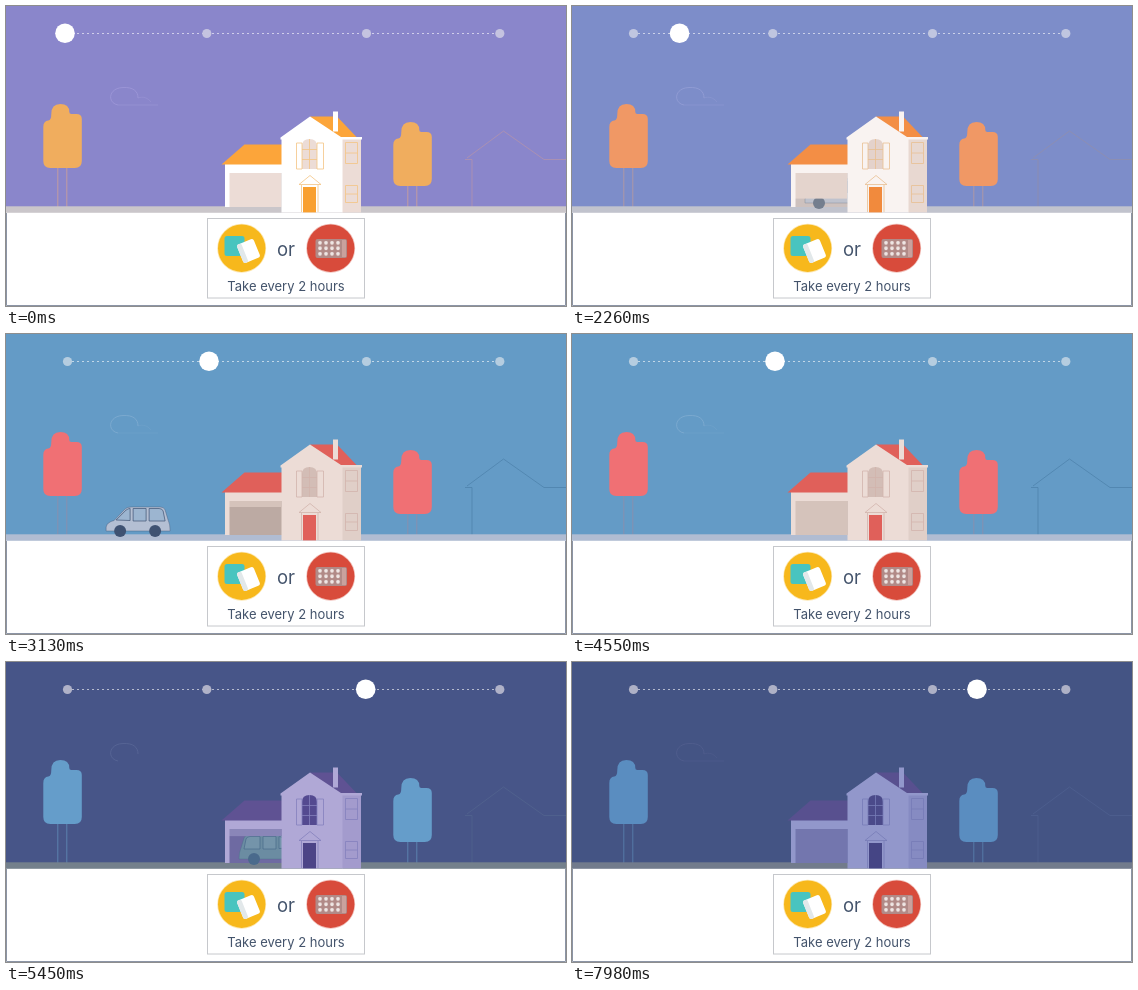
Write an HTML page that moves like this. It is 560 px wide and 300 px high and loops after 8000 ms.

```html
<!DOCTYPE html>
<html lang="en">
<head>
<meta charset="utf-8">
<title>Take every 2 hours</title>
<style>
html, body { margin: 0; width: 100%; height: 100%; overflow: hidden; background: #fff; }
svg { display: block; width: 560px; height: 300px; }
text { font-family: Inter, Lato, sans-serif; fill: #43536b; text-anchor: middle; }
.sky { fill: var(--sky); }
.ground { fill: var(--ground); }
.tree { fill: var(--tree); }
.trunk { fill: none; stroke: var(--trunk); }
.roof { fill: var(--roof); }
.wall { fill: var(--wall); }
.side { fill: var(--side); }
.inside { fill: var(--inside); }
.panel { fill: var(--panel); }
.door { fill: var(--door); }
.pane { fill: var(--pane); }
.trim { fill: none; stroke: var(--trim); stroke-width: .8; }
.far { fill: none; stroke: var(--far); stroke-width: .8; }
.cloud { fill: none; stroke: var(--cloud); stroke-width: .8; }
.body { fill: var(--body); stroke: var(--tyre); stroke-width: .4; }
.glass { fill: var(--glass); stroke: var(--tyre); stroke-width: .7; }
.tyre { fill: var(--tyre); }
.stop { fill: var(--stop); }
</style>
</head>
<body>
<svg id="stage" viewBox="0 0 560 300">
  <defs>
    <linearGradient id="light">
      <stop offset="0" stop-color="#fff" stop-opacity=".75"/>
      <stop offset="1" stop-color="#fff" stop-opacity=".08"/>
    </linearGradient>
    <g id="plant">
      <path class="trunk" d="M51.5 161V201M60.5 161V201"/>
      <path class="tree" d="M44 162Q37 162 37 155V121Q37 115 42 114.500Q45 114 45 108Q45 98 54 98Q63 98 63 106Q63 108 65 108H70Q75.500 108 75.500 113V155Q75.500 162 68.500 162Z"/>
    </g>
    <pattern id="pills" x="311" y="234" width="6" height="5.5" patternUnits="userSpaceOnUse">
      <circle cx="3" cy="2.8" r="1.9" fill="#efe6e4"/>
    </pattern>
  </defs>

  <rect class="sky" width="560" height="207"/>
  <path d="M61 27.5H494" stroke="#fff" stroke-opacity=".6" stroke-dasharray="2 3"/>
  <g class="stop">
    <circle cx="61.5" cy="27.5" r="4.6"/><circle cx="200.8" cy="27.5" r="4.6"/>
    <circle cx="360.5" cy="27.5" r="4.6"/><circle cx="493.8" cy="27.5" r="4.6"/>
  </g>
  <circle id="now" cy="27.3" r="9.8" fill="#fff"/>

  <path class="cloud" d="M112 99C101 97 102 82 117 81.5C127 81 132 85 132 92"/>
  <path class="cloud" id="tail" d="M132 92C137 90 142 92 145 96M112 99H152"/>
  <path class="far" d="M459 153.5H466V201M461 152L497.500 125L538 153.500H560"/>
  <use href="#plant" x=".3"/>
  <use href="#plant" x="350.3" y="18"/>
  <rect class="ground" y="200.300" width="560" height="6.700"/>

  <rect class="inside" x="222" y="166" width="54" height="35"/>
  <g id="car">
    <path class="body" d="M0 197V193Q1 188 8 186.500L19 175Q21 173 25 173H54Q58 173 59 176L62 186Q64 190 64 197Z"/>
    <path class="glass" d="M10 186L20 176Q22 174.500 24 174.500V186.500ZM27 174.500H40V187H27ZM43 174.500H53Q56 174.500 57 177L59 187H43Z"/>
    <circle class="tyre" cx="14" cy="197" r="6"/>
    <circle class="tyre" cx="49" cy="197" r="6"/>
  </g>
  <rect class="panel" id="shutter" x="223" y="166" width="52"/>
  <path class="wall" d="M219 158H276V167H223.500V201H219Z"/>
  <path class="roof" d="M215.500 158.500L238.500 138.500H276V158.500Z"/>
  <path id="beam" d="M62 189L121 181V200L62 193Z" fill="url(#light)"/>

  <path class="roof" d="M304 110.500H331L350.500 131H318Z"/>
  <rect class="wall" x="327" y="105.500" width="5" height="20"/>
  <rect class="side" x="336" y="131" width="19" height="75.500"/>
  <path class="wall" d="M274.500 131.500L304 110.500L335 131H356V133.500H336.500V206.500H275.500V133.500H274.500Z"/>
  <path class="trim" d="M339.500 136.500H351.500V157.500H339.500ZM339.500 147H351.500M339.500 179.500H351.500V196.500H339.500ZM339.500 188H351.500"/>
  <path class="pane" d="M296 163V140Q296 133 303.500 133Q311 133 311 140V163Z"/>
  <path class="trim" d="M290.500 137H296V163H290.500ZM311 137H317.500V163H311ZM303.500 133V163M296 143.500H311M296 153.500H311"/>
  <path class="trim" d="M293 178.500L304 169.500L315 178.500ZM295.500 179V206M312 179V206"/>
  <rect class="door" x="297" y="181" width="13" height="25.500"/>

  <rect y="206.800" width="560" height="94" fill="#fff"/>
  <path d="M.5 207V299.500H559.500V207" fill="none" stroke="#8c95a6"/>
  <rect x="201.500" y="212.500" width="157" height="79.500" fill="#fff" stroke="#c6c8cc"/>
  <g stroke-opacity=".35" stroke-width="1.5">
    <circle cx="235.700" cy="242.200" r="23.700" fill="#f7b81c" stroke="#f7b81c"/>
    <circle cx="324.700" cy="242.200" r="23.700" fill="#d84b3b" stroke="#d84b3b"/>
  </g>
  <rect x="218.500" y="230" width="20" height="20" rx="2.500" fill="#48c4bf"/>
  <g transform="rotate(-22 242.500 245)">
    <rect x="233.500" y="235" width="18" height="20" rx="2.500" fill="#fff"/>
    <rect x="233.500" y="235" width="5" height="20" rx="2" fill="#e2e8ea"/>
  </g>
  <rect x="309.500" y="233" width="31.500" height="19" rx="2" fill="#b18a87"/>
  <rect x="311" y="234" width="24" height="16.500" fill="url(#pills)"/>
  <rect x="336" y="234" width="4" height="17" fill="#c9a19d"/>
  <text x="280" y="249.700" font-size="18.500">or</text>
  <text x="280" y="285" font-size="13">Take every 2 hours</text>
</svg>
<script>
// One colour per time of day: noon, afternoon, night, late night
const colors = {
  sky: "8a86cb 649bc6 475588 445484",
  ground: "cac6ca b0bcd2 74808c 727b8c",
  tree: "f0ad5e f07074 659dca 5a8dc0",
  trunk: "c29ca0 8790b0 5c82b0 567aa8",
  roof: "fca53a e0605a 5f5293 58508f",
  wall: "ffffff ecdcd6 b0a8d6 9297cb",
  side: "ecdcd6 e0cfc8 a39bcd 868bc2",
  inside: "d6cdcb bcaaa3 6e6aa2 5f639c",
  panel: "ecdcd6 d5c3bb 8a86b8 7376ae",
  door: "f9a02f e0605a 4c4487 454585",
  pane: "ecdcd6 d3bdb6 544a90 4b4a8a",
  trim: "f4c585 d2b4ac 8580bd 777cb6",
  far: "b394ac 4f83ad 52648f 4e6090",
  cloud: "9f98d8 80add1 5a6797 525f8f",
  body: "c4c4ca b4bfd3 6b8ca2 6b8ca2",
  glass: "a9b4c4 9cb5d0 7494aa 7494aa",
  tyre: "8f959c 3f5272 4a6a8c 4a6a8c",
  stop: "c5c3e0 b5cde0 b0b2c8 aeb1c6"
};
const rgb = hex => [0, 2, 4].map(i => parseInt(hex.slice(i, i + 2), 16));
const palette = Object.entries(colors).map(([name, list]) => [name, list.split(" ").map(rgb)]);
const stops = [59, 203, 359.7, 494];
const tails = [.6, .35, 0, .6];
const STEP = 30, LOOP = 8000;
const $ = id => document.getElementById(id);
const stage = $("stage"), now = $("now"), tail = $("tail"), car = $("car"),
      shutter = $("shutter"), beam = $("beam");

const mix = (a, b, k) => a + (b - a) * k;
const smooth = p => p * p * (3 - 2 * p);
const along = (list, k) => {
  const i = Math.min(Math.floor(k), 2);
  return mix(list[i], list[i + 1], k - i);
};

function draw(t) {
  const span = (start, length) =>
    Math.max(0, Math.min(1, Math.floor((t - start) / STEP) * STEP / length));
  const shift = (start, length = 231) => smooth(span(start, length));

  const noon = shift(2170), late = shift(7890);
  now.setAttribute("cx", along(stops, noon + shift(5060) + late));

  // Dusk falls a little slower than the marker moves
  const tone = noon + shift(5060, 290) + Math.min(1, late / .34);
  for (const [name, list] of palette) {
    const c = [0, 1, 2].map(i => Math.round(along(list.map(v => v[i]), tone)));
    stage.style.setProperty("--" + name, `rgb(${c})`);
  }
  tail.style.opacity = along(tails, tone);

  const open = span(2170, 300) - span(3190, 300) + span(5060, 120) - span(5420, 750);
  shutter.setAttribute("height", 35 - 28 * open);

  // The car pulls out slowly, then comes home and brakes
  const back = t >= 5060;
  const arrive = 1 - (1 - span(5060, 328)) ** 2;
  const x = back ? mix(-65, 233, arrive) : 233 - 299 * span(2410, 1080) ** 2;
  car.setAttribute("transform", back ? `translate(${x + 64}) scale(-1 1)` : `translate(${x})`);
  car.style.visibility = t < 2170 || back && open <= 0 ? "hidden" : "visible";
  beam.setAttribute("transform", `translate(${x})`);
  beam.style.opacity = back ? 1 - span(5240, 180) : 0;
}

const begin = performance.now();
function tick() {
  draw((performance.now() - begin) % LOOP);
  requestAnimationFrame(tick);
}
tick();
</script>
</body>
</html>
```
